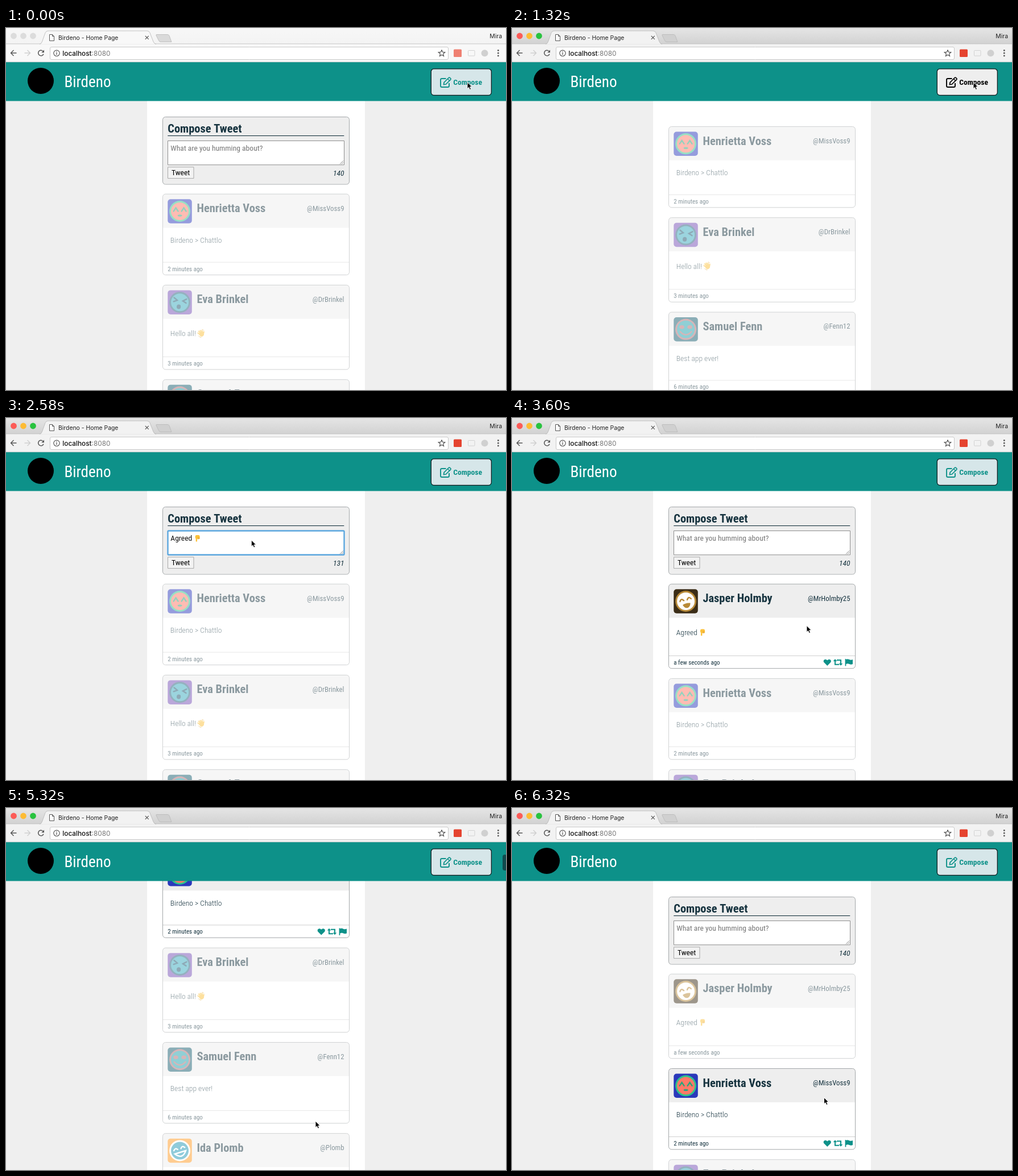
An HTML page with a canvas that plays this animation: 879 px wide and 637 px high, repeating every 6340 ms.

```html
<!DOCTYPE html>
<html lang="en">
<head>
<meta charset="utf-8">
<title>Birdeno - Home Page</title>
<style>
html, body { margin: 0; width: 100%; height: 100%; overflow: hidden; background: #efefef; }
canvas { display: block; width: 879px; height: 637px; }
</style>
</head>
<body>
<canvas id="stage"></canvas>
<script>
const W = 879, H = 637, LOOP = 6340;
const TEAL = '#0d9189', INK = '#16333f';
const canvas = document.getElementById('stage');
const ctx = canvas.getContext('2d');
const dpr = window.devicePixelRatio || 1;
canvas.width = Math.round(W * dpr);
canvas.height = Math.round(H * dpr);

const CLOSE = [400, 800], OPEN = [1320, 1600], SNAP = 1620;
const TYPE_FROM = 1720, TYPE_STEP = 85, POSTED = 2940;
const WORD = 'Agreed ';

const pointer = [
  [0, 811, 95.5], [2300, 811, 95.5], [2720, 307, 254], [3000, 307, 254],
  [3450, 518, 365.5], [3950, 518, 365.5], [4400, 544, 551],
  [6020, 544, 551], [6280, 548.5, 509.5]
];
const scrolling = [[4560, 0], [4700, 80], [4900, 233.5], [5100, 318], [5320, 372.5],
  [5400, 376], [5540, 376], [5700, 250], [5850, 70], [5980, 0]];

const tweets = [
  { name: 'Jasper Holmby', handle: '@MrHolmby25', text: WORD, hand: 'down', age: 'a few seconds ago',
    face: ['#3b2d17', '#b88a38', '#ffffff', '#b88a38', 'grin', -0.25] },
  { name: 'Henrietta Voss', handle: '@MissVoss9', text: 'Birdeno > Chattlo', age: '2 minutes ago',
    face: ['#2b39bb', '#2cc48b', '#ff7967', '#2aa57c', 'calm', 0] },
  { name: 'Eva Brinkel', handle: '@DrBrinkel', text: 'Hello all! ', hand: 'wave', age: '3 minutes ago',
    face: ['#754fb5', '#2a627e', '#36a9bd', '#1d526c', 'wink', 0.12] },
  { name: 'Samuel Fenn', handle: '@Fenn12', text: 'Best app ever!', age: '6 minutes ago',
    face: ['#175c6f', '#b06a70', '#20a0ab', '#b06a70', 'smile', 0] },
  { name: 'Ida Plomb', handle: '@Plomb', text: 'Good morning', age: '8 minutes ago',
    face: ['#ff9a20', '#ffffff', '#2098b5', '#ffffff', 'happy', -0.3] }
];

const swing = p => 0.5 - Math.cos(Math.PI * Math.min(1, Math.max(0, p))) / 2;

function track(keys, t, ease = p => p) {
  let i = 0;
  while (i < keys.length - 1 && t >= keys[i + 1][0]) i++;
  const a = keys[i], b = keys[i + 1];
  if (!b || t <= a[0]) return a.slice(1);
  const p = ease((t - a[0]) / (b[0] - a[0]));
  return a.slice(1).map((v, n) => v + (b[n + 1] - v) * p);
}

// Condensed Roboto, narrowed evenly where no condensed face is available
const pageFont = (size, weight = 400, style = '') =>
  `${style} ${weight} ${size}px "Roboto Condensed", Roboto, sans-serif`;
const setStretch = v => { if ('fontStretch' in ctx) ctx.fontStretch = v; };
const narrow = (() => {
  const sample = 'What are you humming about?';
  ctx.font = '400 40px Roboto, sans-serif';
  const wide = ctx.measureText(sample).width;
  setStretch('condensed');
  ctx.font = pageFont(40);
  const slim = ctx.measureText(sample).width;
  setStretch('normal');
  return slim < wide * 0.95 ? 1 : 0.88;
})();

function label(str, x, y, size, color, { weight = 400, style = '', right = false } = {}) {
  ctx.save();
  setStretch('condensed');
  ctx.font = pageFont(size, weight, style);
  ctx.fillStyle = color;
  ctx.textAlign = right ? 'right' : 'left';
  ctx.translate(x, y);
  ctx.scale(narrow, 1);
  ctx.fillText(str, 0, 0);
  const w = ctx.measureText(str).width * narrow;
  ctx.restore();
  return w;
}

function uiText(str, x, y, size, color, weight = 400, align = 'left') {
  ctx.font = `${weight} ${size}px Inter, Roboto, sans-serif`;
  ctx.fillStyle = color;
  ctx.textAlign = align;
  ctx.fillText(str, x, y);
  return ctx.measureText(str).width;
}

function rect(x, y, w, h, fill) {
  ctx.fillStyle = fill;
  ctx.fillRect(x, y, w, h);
}

function box(x, y, w, h, r, fill, stroke, lw = 1) {
  ctx.beginPath();
  ctx.roundRect(x, y, w, h, r);
  if (fill) { ctx.fillStyle = fill; ctx.fill(); }
  if (stroke) { ctx.strokeStyle = stroke; ctx.lineWidth = lw; ctx.stroke(); }
}

function disc(x, y, r, fill, ry = r) {
  ctx.beginPath();
  ctx.ellipse(x, y, r, ry, 0, 0, 7);
  ctx.fillStyle = fill;
  ctx.fill();
}

function poly(points, fill, stroke, lw = 1) {
  ctx.beginPath();
  points.forEach(([x, y]) => ctx.lineTo(x, y));
  if (fill) { ctx.closePath(); ctx.fillStyle = fill; ctx.fill(); }
  if (stroke) { ctx.strokeStyle = stroke; ctx.lineWidth = lw; ctx.stroke(); }
}

function pathAt(x, y, d, fill, stroke, lw = 1) {
  const p = new Path2D(d);
  ctx.save();
  ctx.translate(x, y);
  if (fill) { ctx.fillStyle = fill; ctx.fill(p); }
  if (stroke) { ctx.strokeStyle = stroke; ctx.lineWidth = lw; ctx.stroke(p); }
  ctx.restore();
}

function avatar(x, y, [bg, ring, skin, ink, mood, tilt]) {
  box(x, y, 42.5, 42.5, 5, bg);
  ctx.save();
  ctx.translate(x + 21.3, y + 21.3);
  disc(0, 0, 18.5, ring);
  disc(0, 0, 15.5, skin);
  ctx.rotate(tilt);
  ctx.lineCap = 'round';
  const line = d => pathAt(0, 0, d, null, ink, 2.4);
  if (mood === 'calm') {
    line('M-11 0L-7 -6L-3 0M3 0L7 -6L11 0');
    disc(0, 7.5, 4, ink, 1.8);
  } else if (mood === 'wink') {
    line('M-11 -7L-5 -3L-11 0M11 -7L5 -3L11 0');
    disc(-1, 8, 3.6, ink, 4);
  } else if (mood === 'smile') {
    disc(-7, -4, 4.2, ink, 3.2);
    disc(7, -4, 4.2, ink, 3.2);
    line('M-10 4Q0 15 10 4');
  } else if (mood === 'grin') {
    line('M-10 -2Q-7 -8 -3 -2M3 -2Q7 -8 10 -2');
    pathAt(0, 0, 'M-7 5Q0 2 7 5Q5 12 0 12Q-5 12 -7 5Z', ink);
  } else {
    line('M-10 -3Q-6 -8 -3 -3M3 -3Q6 -8 10 -3M-10 3Q0 17 10 3Z');
  }
  ctx.restore();
}

// Small hand signs, about one em square
function hand(kind, x, y) {
  ctx.save();
  ctx.translate(x + 6, y - 5);
  ctx.lineCap = 'round';
  const skin = '#fcc23c';
  if (kind === 'wave') {
    ctx.rotate(-0.5);
    pathAt(0, 0, 'M-3 1L-4.5 -3M-1 0L-1.8 -5M1 0L1 -5M3 1L3.5 -3.5M3 3L5.5 0', null, skin, 2.1);
    disc(0, 2, 4, skin);
    pathAt(0, 0, 'M-6 2Q-6 5 -3.5 6.5M5 -5Q6.5 -4 6.5 -2', null, '#e0a52c', 0.8);
  } else {
    box(-4, -5.5, 8, 6.5, 2.5, skin);
    pathAt(0, 0, 'M-1.8 0V5', null, skin, 2.4);
    pathAt(0, 0, 'M1 -1V1.5M3 -1V1', null, '#e9a52a', 1.4);
  }
  ctx.restore();
}

function actions(y) {
  pathAt(554.3, y, 'M0 6L-5.8 .2C-8.5 -3 -4 -7.8 0 -3.6C4 -7.8 8.5 -3 5.8 .2Z', TEAL);
  pathAt(573, y, 'M-5 -4V3.8H2M5 4V-3.8H-2', null, TEAL, 2);
  pathAt(573, y, 'M-8.3 -2L-5 -5.8L-1.7 -2ZM8.3 2L5 5.8L1.7 2Z', TEAL);
  rect(585.6, y - 6, 1.7, 12.5, TEAL);
  pathAt(587, y, 'M0 -5Q3 -6.5 6 -4.8Q9 -3.5 12 -5V3Q9 4.5 6 3Q3 1.6 0 3.2Z', TEAL);
}

const cardHeight = c => c.hand ? 148.5 : 142.3;
const cardStep = c => c.hand ? 166.3 : 160.2;

function card(c, y, active) {
  const h = cardHeight(c), x = 275.5, w = 328;
  ctx.save();
  ctx.beginPath();
  ctx.roundRect(x, y, w, h, 5);
  ctx.clip();
  rect(x, y, w, h, '#fff');
  rect(x, y, w, 59.3, '#eeeeee');
  rect(x, y + h - 22.8, w, 1, '#d0d0d0');
  ctx.restore();
  box(x, y, w, h, 5, null, '#a3a7a9');
  avatar(284.3, y + 9, c.face);
  label(c.name, 335.5, y + 32, 20.4, INK, { weight: 700 });
  label(c.handle, 594.5, y + 29.4, 12.8, INK, { right: true });
  const base = y + (c.hand ? 89.8 : 85.6);
  const tw = label(c.text, 288.8, base, 13.6, INK, { weight: 300 });
  if (c.hand) hand(c.hand, 288.8 + tw, base);
  label(c.age, 284.3, y + h - 7, 11, INK);
  if (active) actions(y + h - 10.8);
  else box(x - 1, y - 1, w + 2, h + 2, 6, 'rgba(255,255,255,.5)');
}

function composer(t, y, h, sliding) {
  const typing = t >= OPEN[0] && t < POSTED;
  const count = typing ? Math.max(0, Math.min(8, Math.floor((t - TYPE_FROM) / TYPE_STEP) + 1)) : 0;
  const dy = y + (sliding ? -1 : 0);
  ctx.save();
  ctx.beginPath();
  ctx.rect(270, y - 1, 340, h + 2);
  ctx.clip();
  box(275.5, y + 0.5, 328, h, 5, '#eeeeee', '#a3a7a9');
  label('Compose Tweet', 284.3, dy + 28, 20.4, INK, { weight: 700 });
  rect(284.3, dy + 33, 310, 1.1, INK);
  box(284.5, dy + 42.5, 310, 42.3, 0, '#fff', '#8d8d8d');
  if (typing) box(284.5, dy + 42.5, 310, 42.3, 1.5, null, '#5aa6de', 2.4);
  pathAt(593, dy + 83.5, 'M-6 0L0 -6M-3 0L0 -3', null, '#777', 0.9);
  let caret = 289.5;
  if (count) {
    caret += label(WORD.slice(0, count), 289.3, dy + 60.4, 13.6, '#111');
    if (count === 8) { hand('down', caret, dy + 60.4); caret += 14; }
  } else {
    label('What are you humming about?', 289.3, dy + 60.4, 13.6, '#757575');
  }
  if (typing && (t < TYPE_FROM + 700 || t % 1000 < 500)) rect(caret, dy + 48, 1, 15, '#000');
  box(284.5, dy + 88.8, 45.5, 19.8, 0, '#f3f3f3', '#a8a8a8');
  label('Tweet', 291, dy + 103.3, 13.6, '#000');
  label(String(140 - (count === 8 ? 9 : count)), 594.5, dy + 104, 13.6, INK, { style: 'italic', right: true });
  ctx.restore();
}

function header(hover, focused) {
  rect(0, 60, W, 68.5, TEAL);
  disc(61, 93, 23, '#000');
  label('Birdeno', 102.5, 104, 27.2, '#fff');
  if (focused) box(745.3, 69.8, 110, 50.5, 6, null, '#3da0d2', 2);
  const ink = hover ? '#000' : TEAL;
  box(747.3, 71.8, 106, 46.5, 5, hover ? '#eeeeee' : '#d6e6e9', '#0a1518', 1.2);
  pathAt(763, 86, 'M10.5 3H3.3Q1 3 1 5.3V15.7Q1 18 3.3 18H13.7Q16 18 16 15.7V11', null, ink, 1.9);
  pathAt(763, 86, 'M6.5 13.5L7 9.8L15.3 1.5Q16.3 .6 17.3 1.5L18.7 2.9Q19.5 3.8 18.6 4.8L10.3 13Z', null, ink, 1.7);
  pathAt(763, 86, 'M13.5 3.5L16.7 6.7', null, ink, 1.3);
  label('Compose', 786.2, 99.9, 13.6, ink, { weight: 700 });
}

function browser(active) {
  const strip = ctx.createLinearGradient(0, 0, 0, 28);
  strip.addColorStop(0, active ? '#e5e5e5' : '#f7f7f7');
  strip.addColorStop(1, active ? '#d2d2d2' : '#f3f3f3');
  rect(0, 0, W, 28, strip);
  const lights = active ? ['#fc5b57', '#fdbc34', '#29c33f'] : ['#dcdcdc', '#dcdcdc', '#dcdcdc'];
  lights.forEach((c, i) => disc(13.5 + i * 17, 14, 5.4, c));
  rect(0, 28, W, 32, active ? '#f2f2f2' : '#f8f8f8');
  rect(0, 27.5, W, 0.8, '#bdbdbd');
  const tab = 'M59 28.5Q62 28 63.5 24L69 8.5Q70.5 5 74 5H248Q251.5 5 253 8.5L259 24Q260.5 28 264 28.5';
  pathAt(0, 0, tab, active ? '#f2f2f2' : '#f8f8f8', '#b5b5b5', 0.8);
  pathAt(0, 0, 'M265 11.5H284Q286 11.5 287 13.5L291 24.5H272Q269.5 24.5 268.5 22L264 13Q263.5 11.5 265 11.5Z',
    active ? '#d0d0d0' : '#dadada', '#b8b8b8', 0.8);
  pathAt(76, 11, 'M.5 .5H5.5L8.5 3.5V11.5H.5ZM5.5 .5V3.5H8.5', '#fff', '#555', 1);
  uiText('Birdeno - Home Page', 92, 20.6, 10.4, '#222');
  pathAt(247.8, 16.8, 'M-3 -3L3 3M3 -3L-3 3', null, '#555', 1.2);
  uiText('Mira', 872, 18, 10.4, '#222', 400, 'right');

  const arrow = 'M5 0H-5M0 -5L-5 0L0 5';
  pathAt(13.5, 44, arrow, null, '#555', 1.4);
  ctx.save();
  ctx.translate(37.5, 44);
  ctx.scale(-1, 1);
  pathAt(0, 0, arrow, null, '#cfcfcf', 1.4);
  ctx.restore();
  ctx.beginPath();
  ctx.arc(61.5, 44, 4.8, 0.4, 5.4);
  ctx.strokeStyle = '#555';
  ctx.lineWidth = 1.5;
  ctx.stroke();
  poly([[67, 38.5], [67, 43.3], [62.2, 43.3]], '#555');

  box(77.5, 33.5, 700, 22, 2.5, '#fff', '#c9c9c9');
  ctx.beginPath();
  ctx.arc(89, 44.3, 5.2, 0, 7);
  ctx.strokeStyle = '#555';
  ctx.lineWidth = 1.2;
  ctx.stroke();
  rect(88.4, 43.5, 1.3, 3.7, '#555');
  rect(88.4, 41.2, 1.3, 1.4, '#555');
  const w = uiText('localhost', 99.3, 48.6, 11.8, '#111', 500);
  uiText(':8080', 99.3 + w, 48.6, 11.8, '#777');
  const star = Array.from({ length: 11 }, (_, i) => {
    const a = i * Math.PI / 5 - Math.PI / 2, r = i % 2 ? 2.7 : 6;
    return [766 + r * Math.cos(a), 44.6 + r * Math.sin(a)];
  });
  poly(star, null, '#555', 1.2);

  box(787, 37.5, 14, 13.5, 1.5, active ? '#e5432f' : '#ef8072');
  box(812.5, 39.5, 11.5, 9.5, 1, null, '#d2d2d2');
  disc(841.5, 44.3, 6, '#d0d0d0');
  [39.5, 44.2, 48.9].forEach(y => disc(865.3, y, 1.4, '#555'));
  rect(0, 59.4, W, 0.8, '#d0d0d0');
}

function arrowCursor(x, y) {
  pathAt(x, y, 'M0 0V11.2L2.6 8.9L4.4 13L6.5 12.1L4.7 8.1H8.2Z', '#000', '#fff', 0.9);
}

function draw(t) {
  ctx.setTransform(dpr, 0, 0, dpr, 0, 0);
  ctx.textBaseline = 'alphabetic';
  const active = t >= 100;
  const [px, py] = track(pointer, t, swing);
  const [scroll] = track(scrolling, t);

  let panel = 118.7, sliding = false;
  if (t >= CLOSE[0] && t < SNAP) {
    sliding = true;
    const amount = t < CLOSE[1]
      ? 1 - swing((t - CLOSE[0]) / (CLOSE[1] - CLOSE[0]))
      : swing((t - OPEN[0]) / (OPEN[1] - OPEN[0]));
    panel = 137.3 * amount;
  }

  rect(0, 0, W, H, '#efefef');
  rect(248, 128, 383, H, '#fff');
  if (panel > 0.5) composer(t, 156 - scroll, panel, sliding);

  // Hover stays with the card that was under the pointer before scrolling
  let y = 156 + panel + 17.5;
  for (const c of t >= POSTED ? tweets : tweets.slice(1)) {
    const over = px > 275 && px < 604 && py > y && py < y + cardHeight(c);
    const top = y - scroll;
    if (top < H && top + 150 > 128) card(c, top, over);
    y += cardStep(c);
  }

  const onButton = active && px > 747 && px < 853 && py > 71 && py < 119;
  header(onButton, t >= CLOSE[0] && t <= OPEN[0]);
  browser(active);

  if (t > 4560 && t < 6250) {
    ctx.globalAlpha = Math.min(1, (6250 - t) / 200);
    box(873, 63.3 + scroll * 0.0504, 8, 28, 4, '#104b4e');
    ctx.globalAlpha = 1;
  }
  arrowCursor(px, py);
}

const start = performance.now();
function tick(now) {
  draw(Math.max(0, now - start) % LOOP);
  requestAnimationFrame(tick);
}
draw(0);
requestAnimationFrame(tick);
</script>
</body>
</html>
```
